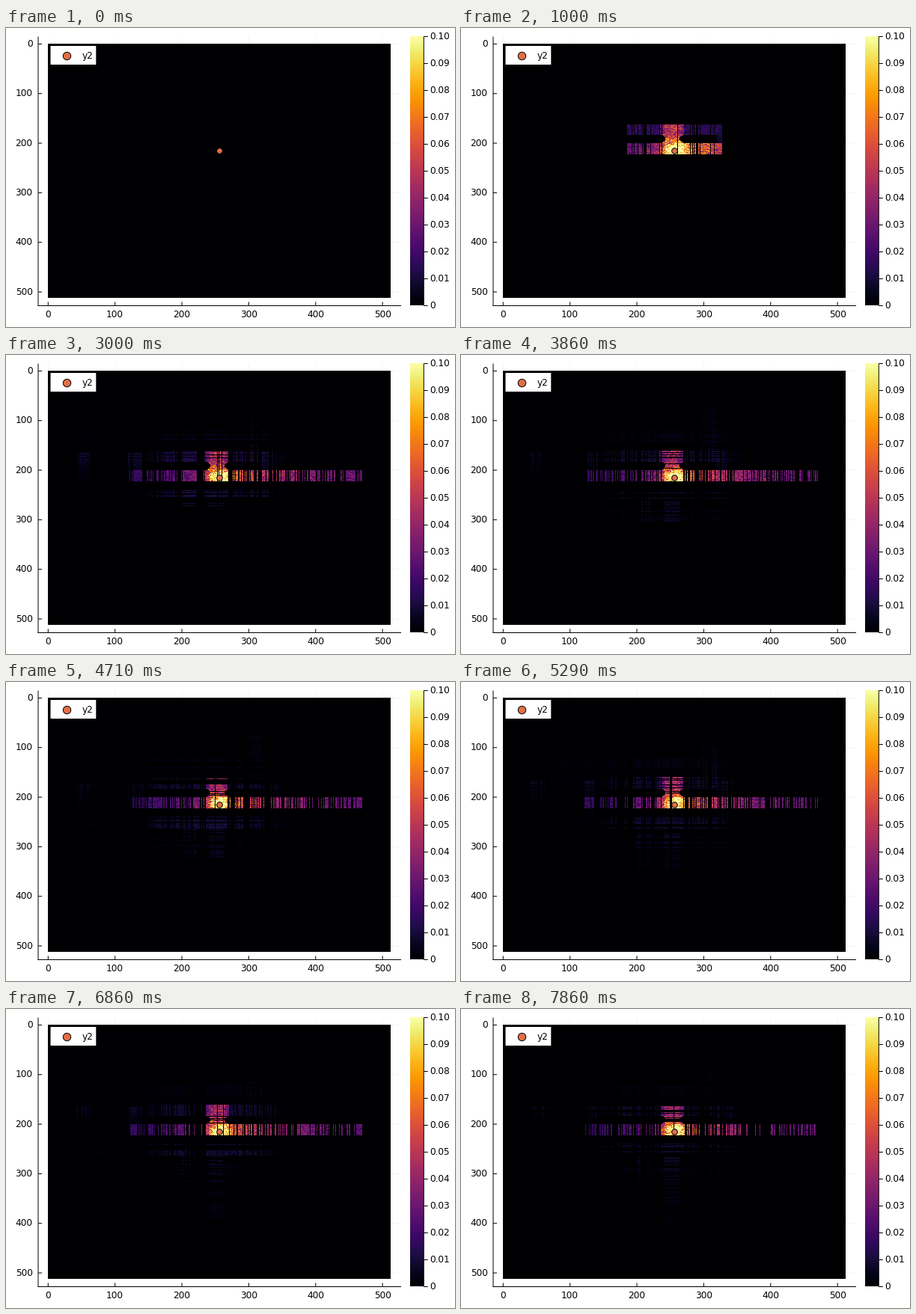
A matplotlib script that plays this animation: 600x400 px, repeating every 8000 ms.

```python
import numpy as np
import matplotlib.pyplot as plt
from matplotlib.animation import FuncAnimation

W, H = 600, 400
FRAMES, LOOP_MS = 56, 8000
N = 512
SX, SY = 256, 215                      # emitter cell
MID, GAP, HALF = 212, 40, 11           # corridor row, spacing, half width
SHAFTS_DOWN = (52, 132, 212, 253, 332)
SHAFT_UP = 309
PT = 0.72                              # points per pixel
ORANGE = "#e36f47"
FONT = dict(family="DejaVu Sans", fontsize=8.7, color="black")


def px(d):
    return 56.3 + 0.8937 * d


def py(d):
    return 21.4 + 0.6633 * d


Y, X = np.mgrid[1:N + 1, 1:N + 1].astype(float)
DX, DY = X - SX, Y - SY
R = np.hypot(DX, DY)
LINES = np.arange(1, N + 1)


def band(coord, centre, half=HALF):
    return np.abs(coord - centre) <= half


def bright_rooms():
    """Main corridor, the hourglass neck above it and the room on top."""
    side = np.where(DX > 0, 0.022 + 0.045 * np.exp(-np.abs(DX) / 80),
                    0.012 + 0.030 * np.exp(-np.abs(DX) / 60))
    core = 0.10 * np.exp(-(R / 13) ** 2)
    corridor = (side + core) * band(Y, MID) * band(X, 297, 174)

    waist = 10 + 0.09 * (Y - 192) ** 2
    neck = (0.05 + 0.0013 * (Y - 192)) * band(Y, 192, 9) * band(X, 254, waist)

    fan = np.exp(-((DX + 2) / (10 + 0.16 * (201 - Y))) ** 4)
    room = (0.019 + 0.022 * fan) * band(Y, MID - GAP) * band(X, 253, 18)
    return np.maximum.reduce([corridor, neck, room])


def dim_rooms():
    """Parallel halls and the shafts that join them, fading with distance."""
    v = np.zeros((N, N))
    near = np.exp(-((X - 247) / 92) ** 8)
    for k in (-2, -1, 1, 2):
        level = (0.0022 + 0.010 * near / k ** 2) * band(X, 200, 160)
        v = np.maximum(v, level * band(Y, MID + GAP * k))
    for x in SHAFTS_DOWN:
        off = abs(x - SX)
        start = 264 if off < 60 else 165
        level = 0.011 * np.exp(-np.abs(Y - start) * (1 + off / 60) / 130)
        v = np.maximum(v, level * band(X, x) * (Y > start))
    up = 0.010 * np.exp(-(MID - Y) / 150)
    return np.maximum(v, up * band(X, SHAFT_UP) * band(Y, 130, 52))


BRIGHT, DIM = bright_rooms(), dim_rooms()


def stripes(rng, keep):
    """Random on/off lines that tend to gather in clumps."""
    clump = np.convolve(rng.normal(size=N), np.ones(9) / 9, mode="same")
    odds = np.where(keep > 0.85, keep, keep + 0.6 * clump)
    return rng.random(N) < odds


def front(n):
    """Cells the wave can have reached by step n."""
    side = 10.15 * n
    up = max(min(10 * n, 53), min(5.6 * n, 172))
    down = max(9, 3.9 * n - 14)
    seen = (DX > -min(side, 215)) & (DX < side) & (DY > -up) & (DY < down)
    return seen & (R < 1.3 * side)


def field(n):
    if n == 0:
        return np.zeros((N, N))
    rng = np.random.default_rng(40 + n)
    young = np.exp(-n / 15)

    noise = rng.random((N, N))
    streak = (noise + np.roll(noise, 1, 1) + np.roll(noise, 2, 1)) / 3
    v = np.maximum(BRIGHT * (1 + 0.35 * young), DIM * (0.6 + young))
    v *= (0.4 + 0.6 * noise + 0.6 * streak) * front(n)

    cols = np.where(band(LINES, 253, 16), 0.95, 0.44 + 0.5 * young)
    rows = np.where(band(LINES, 182, 19), 0.72, 0.40) + 0.4 * young
    rows[band(LINES, MID)] = 0.985
    return v * np.outer(stripes(rng, rows), stripes(rng, cols))


fig = plt.figure(figsize=(W / 100, H / 100), dpi=100, facecolor="white")
ax = fig.add_axes([0, 0, 1, 1])
ax.axis("off")


def line(xs, ys, color="black", width=1, z=3):
    ax.plot(xs, ys, color=color, lw=width * PT, zorder=z, snap=False,
            solid_capstyle="butt")


def dot(x, y, r):
    ax.plot([x], [y], "o", ms=2 * r * PT, mfc=ORANGE, mec="black",
            mew=PT, zorder=6, snap=False)


def label(x, y, text, ha, va="center"):
    ax.text(x, y, text, ha=ha, va=va, zorder=6, **FONT)


LEFT, RIGHT, TOP, BOTTOM, BAR = 43, 528, 11.5, 371.5, 558.3

for d in range(0, 501, 100):
    x, y = px(d), py(d)
    line([x, x], [TOP, BOTTOM], "#f2f2f2", 0.7, 1)
    line([LEFT, RIGHT], [y, y], "#f2f2f2", 0.7, 1)
    line([x, x], [BOTTOM, BOTTOM - 5])
    line([LEFT, LEFT + 5], [y, y])
    label(x, 383.5, str(d), "center")
    label(35.5, y, str(d), "right")
line([LEFT, LEFT], [TOP, BOTTOM + 0.5])
line([LEFT - 0.5, RIGHT], [BOTTOM, BOTTOM])

heat = ax.imshow(np.zeros((N, N)), cmap="inferno", vmin=0, vmax=0.1,
                 extent=(px(0), px(N), py(N), py(0)), aspect="auto",
                 interpolation="nearest", zorder=2)

ax.imshow(np.linspace(1, 0, 256)[:, None], cmap="inferno", aspect="auto",
          extent=(540, 558, BOTTOM, TOP), interpolation="nearest", zorder=2)
line([BAR, BAR], [TOP, BOTTOM])
for i in range(11):
    y = BOTTOM - 36 * i
    line([BAR, BAR + 5.5], [y, y])
    label(566.3, y, f"{i / 100:.2f}" if i else "0", "left")

ax.add_patch(plt.Rectangle((59.5, 24), 60.8, 25, fc="white", ec="none",
                           zorder=5, snap=False))
dot(81, 36.8, 5.2)
label(102, 41, "y2", "left", "baseline")
dot(285.1, 164, 3.8)

ax.set_xlim(0, W)
ax.set_ylim(H, 0)


def update(n):
    heat.set_data(field(n))
    return [heat]


anim = FuncAnimation(fig, update, frames=FRAMES, interval=LOOP_MS / FRAMES,
                     repeat=True, repeat_delay=0, blit=False)
plt.show()
```
